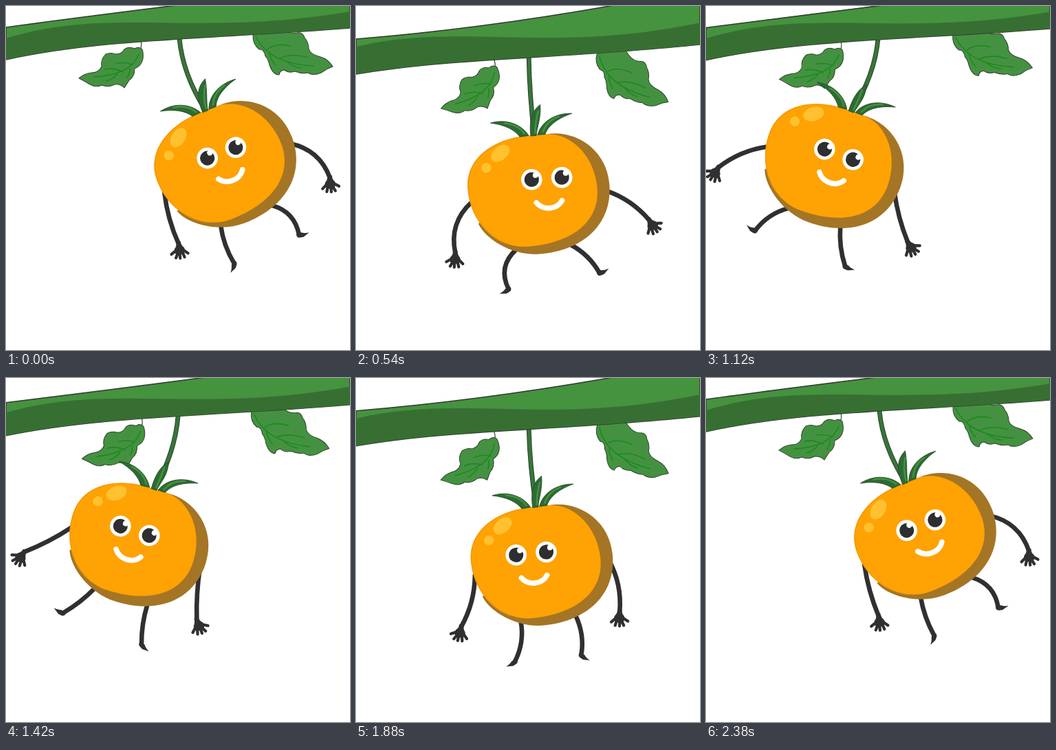
An HTML page for the animation above (2.4 s loop, 500 px wide and 500 px high).

```html
<!DOCTYPE html>
<html lang="en">
<head>
<meta charset="utf-8">
<title>Swinging tomato</title>
<style>
html, body { margin: 0; width: 100%; height: 100%; overflow: hidden; background: #fff; }
svg { display: block; width: 100%; height: 100%; }
.leaf { fill: #449241; stroke: #33402f; stroke-width: 1; stroke-linejoin: round; }
.vein { fill: none; stroke: #1b8a1d; stroke-width: 1.6; stroke-linecap: round; }
.sepal { fill: #2c6b32; stroke: #28492a; stroke-width: .8; stroke-linejoin: round; }
.shine { fill: none; stroke: #43913f; stroke-width: 2.6; stroke-linecap: round; }
.limb { fill: none; stroke: #303032; stroke-width: 6.6; stroke-linecap: round; }
.finger { fill: none; stroke: #303032; stroke-width: 4.2; stroke-linecap: round; }
.ink { fill: #303032; }
</style>
</head>
<body>
<svg viewBox="0 0 500 500" xmlns="http://www.w3.org/2000/svg">
  <defs>
    <g id="hand">
      <path class="ink" d="M-3.3,-3 Q-3,3 -7,7 Q-9,14 -3,16 L4,16 Q10,13 7,6 Q3,3 3.3,-3 Z"/>
      <path class="finger" d="M-4,9 L-11,16 M-3,12 L-5,20.5 M1,12 L1.5,21 M3,12 L7.5,19.5 M4,8 L13,13"/>
    </g>
    <path id="foot" class="ink" d="M-3.8,-1 Q-4,4 1,4.2 L6,4 L15,-1 Q8,-.6 3.5,-3 Z"/>
    <g id="eye">
      <circle r="15.3" fill="#fff"/>
      <circle r="10.6" fill="#2e2e30"/>
      <circle cx="6" cy="-6" r="4" fill="#fff"/>
    </g>
  </defs>

  <g id="leftLeaf">
    <path d="M193,46 Q199,53 195.500,63" fill="none" stroke="#3b3b3b" stroke-width="1.2"/>
    <path class="leaf" d="M106,105 Q114,98 124,97 Q135,97 139,88 Q137,78 145,70 Q152,67 160,70 Q168,70 172,63 Q178,58 187,62 Q193,58 198,63 Q200,69 199,77 Q197,87 187,91 Q187,103 179,108 L172,119 Q166,113 158,114 Q148,119 139,115 Q131,119 122,114 Q114,109 106,105 Z"/>
    <path class="vein" d="M193,70 Q182,100 128,103 M184,86 Q176,81 160,83 M170,96 Q155,89 144,92 M180,91 Q180,98 176,104 M162,99 Q154,107 146,109"/>
  </g>
  <g id="rightLeaf">
    <path class="leaf" d="M362,20 L359,42 Q358,55 368,63 Q375,62 377,73 Q381,77 383,86 Q388,100 397,100 Q398,93 405,93 Q411,98 420,95 Q430,99 439,97 Q446,102 458,97 Q466,91 475,88 Q468,77 457,74 Q442,70 440,62 Q440,53 434,46 Q431,37 423,39 Q413,41 404,33 L390,20 Z"/>
    <path class="vein" d="M363,44 Q382,84 447,87 M380,63 Q392,53 414,58 M398,76 Q415,68 438,75 M383,68 Q384,78 392,86 M408,81 Q418,89 429,90"/>
  </g>
  <path id="stemEdge" fill="none" stroke="#2b3f2b" stroke-width="6.8"/>
  <path id="stem" fill="none" stroke="#38763a" stroke-width="4.8"/>

  <path id="light" fill="#45923f" stroke="#333d30" stroke-width="1.6"/>
  <path id="dark" fill="#376f33"/>

  <g id="swing">
    <g id="limbs"></g>
    <path fill="#a47525" d="M18,112 C60,108 104,140 104,192 C104,250 58,285 -5,285 C-42,285 -80,260 -90,235 Z"/>
    <path fill="#ffa203" d="M-9,112 C-58,113 -102,137 -102,183 C-102,235 -62,273 -22,273 C46,273 86,243 86,196 C86,150 55,114 21,112 Q6,110.500 -9,112 Z"/>
    <path fill="none" stroke="#ee980c" stroke-width="1.6" stroke-opacity=".7" d="M-9,112.800 C-58,114 -101,138 -101,183 C-101,222 -80,253 -52,266"/>
    <ellipse rx="15.500" ry="10" transform="translate(-51,135) rotate(-36)" fill="#ffc130"/>
    <circle cx="-73" cy="154.500" r="7.200" fill="#ffc130"/>
    <path class="sepal" d="M-62,90 C-40,85 -18,94 -8,112 L-21,113 C-28,102 -42,94 -62,90 Z"/>
    <path class="shine" d="M-42,91.500 Q-22,95 -14,109"/>
    <path class="sepal" id="midSepal"/>
    <path class="shine" id="midShine"/>
    <path class="sepal" d="M57,84.500 C35,82 12,92 5,112 L16,112 C20,102 32,91 57,84.500 Z"/>
    <path class="shine" d="M38,87.500 Q20,92 13,108"/>
    <g id="face">
      <use href="#eye" x="-22"/>
      <use href="#eye" x="22"/>
      <path d="M-17.500,34 C-9,46 11,47 20,33.500" fill="none" stroke="#fff" stroke-width="7.600" stroke-linecap="round"/>
    </g>
  </g>
</svg>
<script>
const LOOP = 2400;
const $ = id => document.getElementById(id);
const set = (el, name, value) => el.setAttribute(name, value);
const mix = (a, b, k) => a + (b - a) * k;
const rad = deg => deg * Math.PI / 180;

// Eased cosine: 1 at phase 0, -1 at phase 0.5
function wave(phase, power = 2.15) {
  const p = phase - Math.floor(phase);
  const x = p < .5 ? p * 2 : 2 - p * 2;
  const y = x < .5 ? (2 * x) ** power / 2 : 1 - (2 - 2 * x) ** power / 2;
  return 1 - 2 * y;
}

function makeLimb(x, y, side, length, tip) {
  const ns = "http://www.w3.org/2000/svg";
  const line = document.createElementNS(ns, "path");
  const end = document.createElementNS(ns, "use");
  set(line, "class", "limb");
  set(end, "href", "#" + tip);
  $("limbs").append(line, end);
  // angle: outward from straight down, bend: outward bulge, turn: tip rotation
  return (angle, bend, turn) => {
    const sin = Math.sin(rad(angle)), cos = Math.cos(rad(angle));
    const ex = x + side * length * sin, ey = y + length * cos;
    const cx = (x + ex) / 2 + side * 2 * bend * cos;
    const cy = (y + ey) / 2 - 2 * bend * sin;
    set(line, "d", `M${x},${y} Q${cx},${cy} ${ex},${ey}`);
    set(end, "transform", `translate(${ex},${ey}) scale(${side},1) rotate(${turn})`);
  };
}

const rightArm = makeLimb(98, 200, 1, 76, "hand");
const leftArm = makeLimb(-98, 203, -1, 77, "hand");
const rightLeg = makeLimb(42, 275, 1, 58, "foot");
const leftLeg = makeLimb(-38, 276, -1, 58.5, "foot");

// Heights of a branch edge at its four control points, raised and lowered
const edge = (xs, up, down, k) => xs.map((x, i) => [x, mix(up[i], down[i], k)]);

function drawBranch(k) {
  const top = edge([0, 160, 320, 500], [31, 9, -10, -32], [48.400, 35.500, 12.500, -25], k);
  const seam = edge([0, 150, 280, 500], [47, 0, 46, 8], [59.500, 23.500, 71, 24.500], k);
  const low = edge([0, 140, 300, 500], [78, 47, 48, 32], [99.500, 75.500, 77.500, 56.500], k);
  const under = low.slice().reverse();
  const shape = upper =>
    `M${upper[0]} C${upper.slice(1).join(" ")} L${under[0]} C${under.slice(1).join(" ")} Z`;
  set($("light"), "d", shape(top));
  set($("dark"), "d", shape(seam));
}

function draw(ms) {
  const p = ms / LOOP;
  const c = wave(p), s = wave(p - .25);
  const k = (1 - wave(2 * p, 2)) / 2;
  const tilt = -20.500 * c;
  const px = 251, py = 47 + 29.500 * k;

  drawBranch(k);
  set($("leftLeaf"), "transform", `translate(${6.500 * k},${26.500 * k}) rotate(${-12.500 * k},196,62)`);
  set($("rightLeaf"), "transform", `translate(${-9 * k},${28.500 * k}) rotate(${12.500 * k},359,42)`);

  const a = rad(tilt);
  const sx = px - 112 * Math.sin(a), sy = py + 112 * Math.cos(a);
  const stem = `M${px + c},${py - 12} L${px + c},${py} Q${px + c + (sx - px) * .12},${py + 52} ${sx},${sy}`;
  set($("stemEdge"), "d", stem);
  set($("stem"), "d", stem);

  set($("swing"), "transform", `translate(${px},${py}) rotate(${tilt})`);
  const tx = 11 + 4.500 * c;
  set($("midSepal"), "d", `M${tx},68.500 C-2,77 -6,92 -5,113 L3,113 C5,100 12,88 ${tx},68.500 Z`);
  set($("midShine"), "d", `M${tx - 3.500},78 Q3,92 1.500,109`);
  set($("face"), "transform", `translate(${13.800 * s},${177.700 - 1.500 * s})`);

  rightArm(29 + 23 * s, 4 + 6.500 * c, -(14 - 35 * wave(p + .07)));
  leftArm(26 - 21 * c, 3 + 8 * s, -(10 - 6 * s));
  rightLeg(22 + 19.500 * s, 3 + 6 * c, 12 - 30 * s);
  leftLeg(18.500 - 17.500 * c, 3 + 8 * s, 21 + 31 * c);
}

const start = performance.now();
function tick() {
  draw((performance.now() - start) % LOOP);
  requestAnimationFrame(tick);
}
draw(0);
requestAnimationFrame(tick);
</script>
</body>
</html>
```
